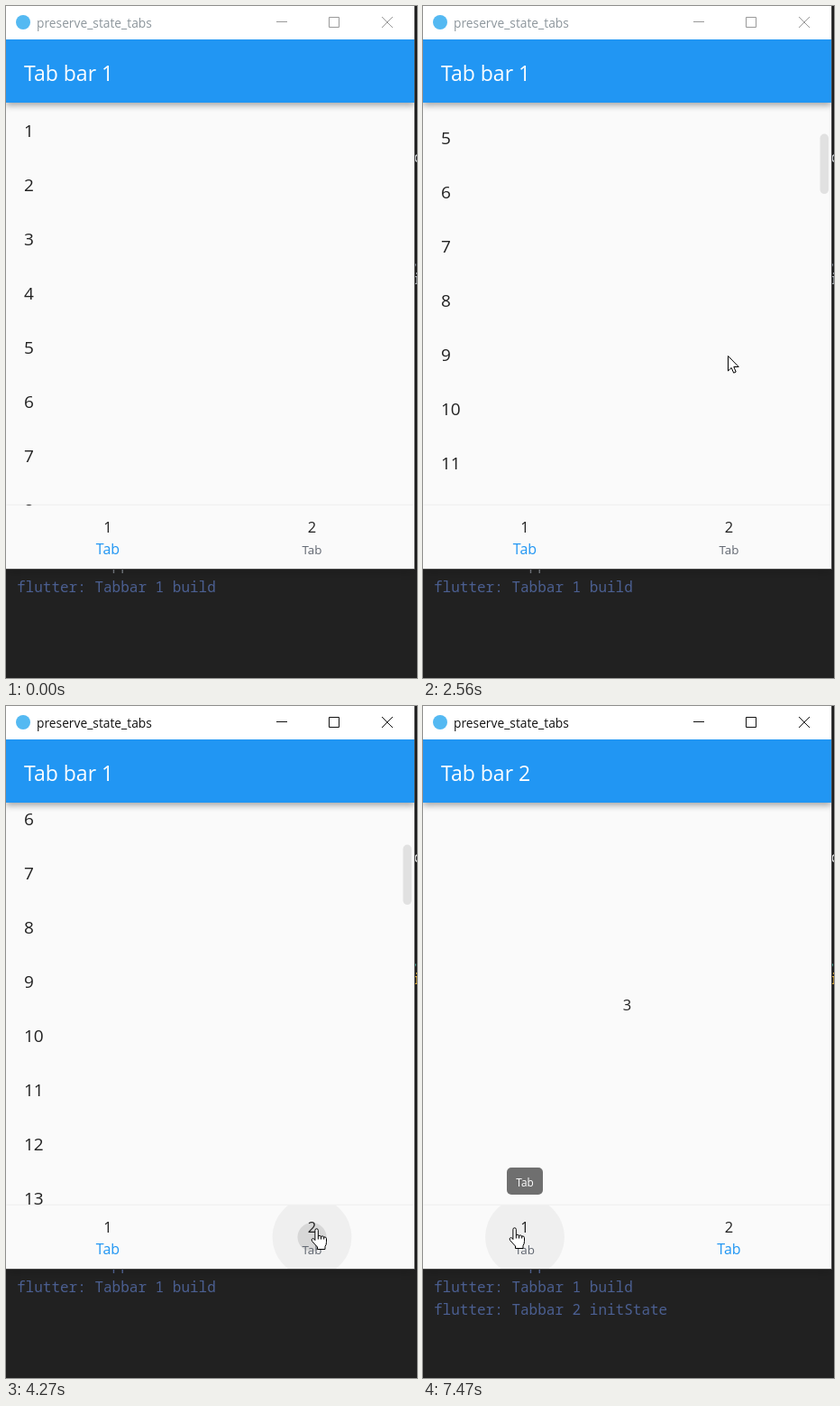
These frames come from a looping animation (456 px wide and 744 px high, 8000 ms). An HTML page with a canvas:

```html
<!DOCTYPE html>
<html lang="en">
<head>
<meta charset="utf-8">
<title>preserve_state_tabs</title>
<style>
  html, body { margin: 0; width: 100%; height: 100%; overflow: hidden; background: #212121; }
  canvas { display: block; }
</style>
</head>
<body>
<canvas id="stage" width="456" height="744"></canvas>
<script>
const ctx = document.getElementById('stage').getContext('2d');
const LOOP = 8000, STEP = 70;
const WIDTH = 453, BAR = 37, BODY = 107, NAV = 553, BOTTOM = 623;
const SANS = '"Open Sans", "Noto Sans", sans-serif';
const MONO = '"Noto Sans Mono", monospace';
const INK = '#212121', BLUE = '#2196f3', PAPER = '#fafafa';
const TAB_X = [113, 339.5];

const STROKES = [
  { start: 1050, end: 1540, from: [405, 830], to: [338, 387], power: 3.2 },
  { start: 3500, end: 4000, from: [338, 387], to: [344, 578], power: 2.5 },
  { start: 6010, end: 6480, from: [344, 578], to: [101, 577], power: 2 }
];
const WHEEL = [
  { start: 1800, end: 2090, by: 144 },
  { start: 2420, end: 2840, by: 159 },
  { start: 3170, end: 3240, by: 10 }
];
const CLICK = { start: 4200, end: 4750 };
const PRESS = CLICK.start + STEP, SWITCH = 4410, COUNT_MS = 995;
const MOTIONS = [...STROKES, ...WHEEL, CLICK].sort((a, b) => a.start - b.start);

// When the pointer is over each tab.
const HOVERS = [[[6220, LOOP]], [[1130, 1260], [3740, 6170]]];

const ARROW = new Path2D('M0 0V16.5L3.7 13 6.2 18.7 8.7 17.6 6.3 12H11.7Z');
const HAND = new Path2D(
  'M-1.6 13V2a1.7 1.7 0 0 1 3.4 0V8.5q1.6-1.6 3.2.3 1.8-1 3.2.6 2.6-.4 2.8 1.8V15' +
  'Q11 18 9.5 20V23H1V20.5L-5 14Q-6.2 11.5-4 11-2.8 11-1.6 13ZM1.8 8.5V12M5 8.8V12M8.2 9.4V12');

const mix = (a, b, p) => a + (b - a) * p;
const ramp = (t, a, b) => Math.max(0, Math.min(1, (t - a) / (b - a)));
const easeOut = (t, { start, end, power = 2 }) => 1 - (1 - ramp(t, start, end)) ** power;
const pulse = (t, on, off, rise, fall) => Math.min(ramp(t, on, on + rise), 1 - ramp(t, off, off + fall));
const overTab = (i, strength) => Math.max(...HOVERS[i].map(strength));

// The picture only updates in steps while something moves.
function snap(t) {
  const m = MOTIONS.filter(m => m.start + STEP <= t).pop();
  return m ? Math.min(m.end, m.start + Math.floor((t - m.start) / STEP) * STEP) : 0;
}

function rect(x, y, w, h, color) {
  ctx.fillStyle = color;
  ctx.fillRect(x, y, w, h);
}

function roundRect(x, y, w, h, r, color) {
  ctx.fillStyle = color;
  ctx.beginPath();
  ctx.roundRect(x, y, w, h, r);
  ctx.fill();
}

function disc(x, y, r, color) {
  roundRect(x - r, y - r, 2 * r, 2 * r, r, color);
}

function text(str, x, y, size, color, align = 'left', family = SANS, weight = 400) {
  ctx.font = `${weight} ${size}px ${family}`;
  ctx.textAlign = align;
  ctx.fillStyle = color;
  ctx.fillText(str, x, y);
}

function shadowed(alpha, blur, dy, draw) {
  ctx.save();
  ctx.shadowColor = `rgba(0,0,0,${alpha})`;
  ctx.shadowBlur = blur;
  ctx.shadowOffsetY = dy;
  draw();
  ctx.restore();
}

function clipped(x, y, w, h, draw) {
  ctx.save();
  ctx.beginPath();
  ctx.rect(x, y, w, h);
  ctx.clip();
  draw();
  ctx.restore();
}

function drawEditor(active, second) {
  const code = (str, x, y, color) => text(str, x, y, 16, color, 'left', MONO);
  rect(0, 0, 456, 744, '#212121');
  shadowed(.25, 10, 2, () => rect(0, 0, WIDTH, BOTTOM, '#212121'));
  code('Restarted application in 806ms.', 12, 624, active ? '#4c5d8a' : '#6c7076');
  code('flutter: Tabbar 1 build', 12, 649, '#4b5f91');
  if (second) code('flutter: Tabbar 2 initState', 12, 674, '#4b5f91');
  code('c', 452, 173, active ? '#e4e4e4' : '#d0d4d8');
  code(',', 449, 288, active ? '#4ec9b0' : '#9aa7b3');
  code('i', 451, 308, active ? '#d9a93a' : '#a8adb2');
}

function drawTitleBar(active) {
  rect(0, 0, WIDTH, BAR, '#fff');
  disc(19, 18, 8, '#54b9f2');
  text('preserve_state_tabs', 34, 24, 13.8, active ? '#111' : '#8d969c');
  ctx.strokeStyle = active ? '#111' : '#999';
  ctx.lineWidth = 1;
  ctx.stroke(new Path2D('M300 17.5H312M358.5 12.5H369.5V23.5H358.5ZM417 12L429 24M429 12L417 24'));
}

function drawList(offset) {
  for (let n = 1; n <= 50; n++) text(n, 20, 85 + 60 * n - offset, 19, INK);
  if (offset > 0) {
    const scale = (NAV - BODY) / 3000;
    roundRect(440.5, BODY + offset * scale, 9.5, 66.5, 5, '#e1e1e1');
  }
}

function drawTab(i, t) {
  const x = TAB_X[i], moved = ramp(t, SWITCH - STEP, SWITCH + 130), on = i ? moved : 1 - moved;
  const hover = overTab(i, ([a, b]) => pulse(t, a, b, 150, 60));
  disc(x, 588, 44, `rgba(0,0,0,${.045 * hover})`);
  if (i && t >= PRESS) {
    const p = ramp(t, PRESS, PRESS + 420);
    disc(x, 588, mix(16, 44, p), `rgba(0,0,0,${.1 * (1 - p)})`);
  }
  const color = [[96, 33], [102, 150], [112, 243]].map(([a, b]) => Math.round(mix(a, b, on)));
  text(i + 1, x, 583, 16.5, INK, 'center');
  text('Tab', x, 607, mix(13.4, 16, on), `rgb(${color})`, 'center');
}

function drawTooltip(i, t) {
  const x = TAB_X[i] + i / 2;
  const alpha = overTab(i, ([a, b]) => pulse(t, a + 86, b + 180, 150, 75));
  if (!alpha || (i && t >= PRESS)) return;
  roundRect(x - 20, 511, 40, 30, 5, `rgba(97,97,97,${.9 * alpha})`);
  text('Tab', x, 531.5, 11.8, '#fff', 'center');
}

function drawPointer(t) {
  const stroke = STROKES.filter(s => s.start < t).pop();
  if (!stroke) return;
  const p = easeOut(t, stroke);
  const [x, y] = stroke.from.map((v, i) => mix(v, stroke.to[i], p));
  const shape = y >= NAV && y < BOTTOM ? HAND : ARROW;
  ctx.save();
  ctx.translate(Math.round(x) + .5, Math.round(y) + .5);
  ctx.fillStyle = '#fff';
  ctx.strokeStyle = '#000';
  ctx.lineWidth = 1;
  ctx.lineJoin = 'round';
  ctx.fill(shape);
  ctx.stroke(shape);
  ctx.restore();
}

function draw(now) {
  const t = snap(now), active = t >= PRESS, second = t >= SWITCH;
  drawEditor(active, second);
  rect(0, 0, WIDTH + 1, BOTTOM + 1, '#484848');
  clipped(0, 0, WIDTH, BOTTOM, () => {
    rect(0, 0, WIDTH, BOTTOM, PAPER);
    if (second) text(Math.floor((now - 4480) / COUNT_MS + 1) - 1 || 0, 226.5, 337, 16.5, INK, 'center');
    else drawList(WHEEL.reduce((sum, w) => sum + w.by * easeOut(t, w), 0));
    shadowed(.35, 7, 3, () => rect(0, BAR, WIDTH, BODY - BAR, BLUE));
    text(`Tab bar ${second ? 2 : 1}`, 20, 82.5, 23, '#fff', 'left', SANS, 500);
    drawTitleBar(active);
    shadowed(.15, 3, -.5, () => rect(0, NAV, WIDTH, BOTTOM - NAV, PAPER));
  });
  clipped(0, NAV, WIDTH, BOTTOM - NAV, () => TAB_X.forEach((_, i) => drawTab(i, t)));
  TAB_X.forEach((_, i) => drawTooltip(i, t));
  drawPointer(t);
}

function frame() {
  draw(performance.now() % LOOP);
  requestAnimationFrame(frame);
}
frame();
</script>
</body>
</html>
```
